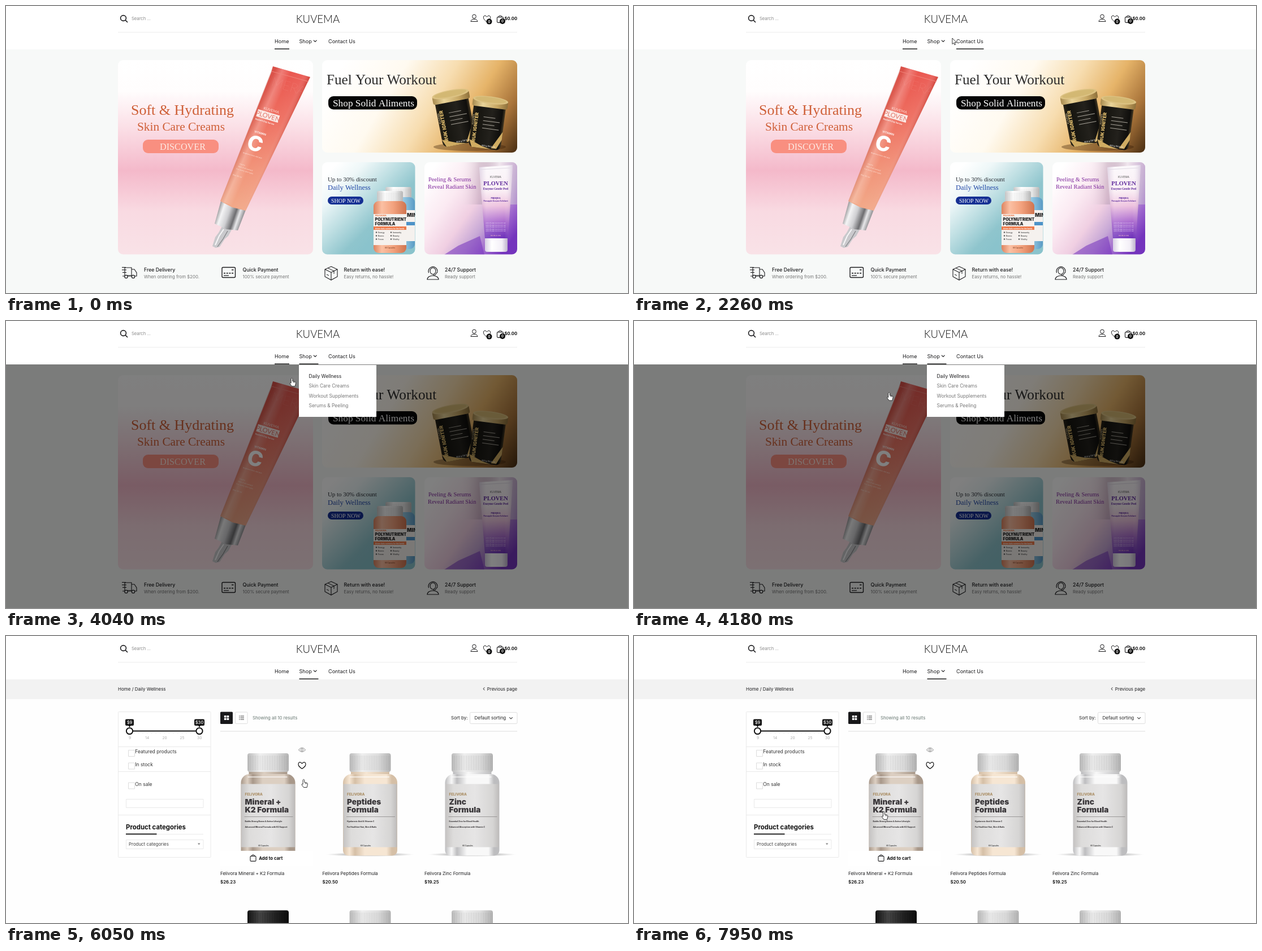
Animation, 1100 px wide and 509 px high, one loop 8 s. Source, as an HTML page with a canvas:

```html
<!DOCTYPE html>
<html lang="en">
<head>
<meta charset="utf-8">
<title>Shop walkthrough</title>
<style>
html, body { margin: 0; width: 100%; height: 100%; overflow: hidden; background: #fff; }
canvas { display: block; width: 1100px; height: 509px; }
</style>
</head>
<body>
<canvas id="stage" width="1100" height="509"></canvas>
<script>
const g = document.getElementById('stage').getContext('2d');
const LOOP = 8000, MENU_AT = 2330, SHOP_AT = 4250, IMAGES_AT = 4740, READY_AT = 4860;
const UI = 'Inter, sans-serif', PLAIN = '"Liberation Sans", Arial, sans-serif';
const SERIF = '"Liberation Serif", serif', LOGO = 'Lato, sans-serif';
const INK = '#1c1c1e', GREY = '#777', HAIR = '#e9e9e9';
const BRAND = 'KUVEMA', RANGE = 'PLOVEN', MAKER = 'Felivora';

// time, x, y of the pointer tip
const PATH = [
  [390, 1084, 489], [750, 1050, 350], [1150, 957, 154], [1220, 951, 150], [1600, 800, 104],
  [1970, 649, 61], [2260, 563, 57], [2330, 554, 58], [2680, 551, 61], [2880, 551, 63],
  [3120, 548, 96], [3300, 543, 89], [3555, 543, 89], [3560, 537, 88], [3695, 537, 88],
  [3770, 541, 96], [3965, 541, 96], [4040, 506, 101], [4300, 405, 148], [4670, 311, 194],
  [5200, 335, 240], [5560, 414, 300], [5800, 470, 288], [6050, 526, 254], [6400, 725, 262],
  [6700, 785, 280], [7000, 720, 286], [7270, 527, 288], [7500, 470, 300], [7950, 442, 311]
];
// product column, pointer enters, pointer leaves
const HOVERS = [[0, 5570, 6100], [1, 6130, 6430], [2, 6450, 6920], [1, 6960, 7220], [0, 7290, 9999]];

const clamp = v => Math.max(0, Math.min(1, v));

function text(str, x, y, size, color = INK, weight = 400, font = UI, align = 'left') {
  g.font = `${weight} ${size}px ${font}`;
  g.textAlign = align;
  g.fillStyle = color;
  g.fillText(str, x, y);
}
function paint(fill, stroke, width = 1) {
  if (fill) { g.fillStyle = fill; g.fill(); }
  if (stroke) { g.strokeStyle = stroke; g.lineWidth = width; g.stroke(); }
}
function box(x, y, w, h, r, fill, stroke, width) {
  g.beginPath(); g.roundRect(x, y, w, h, r); paint(fill, stroke, width);
}
function oval(x, y, rx, ry, fill, stroke, width) {
  g.beginPath(); g.ellipse(x, y, rx, ry, 0, 0, 7); paint(fill, stroke, width);
}
function trace(pts) {
  g.beginPath();
  for (let i = 0; i < pts.length; i += 2) g.lineTo(pts[i], pts[i + 1]);
}
function poly(fill, ...pts) { trace(pts); g.closePath(); paint(fill); }
function line(color, width, ...pts) { trace(pts); paint(null, color, width); }
function grad(x0, y0, x1, y1, ...stops) {
  const gr = g.createLinearGradient(x0, y0, x1, y1);
  for (let i = 0; i < stops.length; i += 2) gr.addColorStop(stops[i], stops[i + 1]);
  return gr;
}
function at(x, y, angle, draw) {
  g.save(); g.translate(x, y); g.rotate(angle); draw(); g.restore();
}
function card(x, y, w, h, fill, draw) {
  g.save();
  box(x, y, w, h, 9, fill);
  g.clip(); draw(); g.restore();
}

// ---- icons ----
function heart(x, y, s, color = INK, width = 1) {
  g.beginPath();
  g.moveTo(x, y + s);
  g.bezierCurveTo(x - s * 2, y - s * .2, x - s * .8, y - s * 1.7, x, y - s * .55);
  g.bezierCurveTo(x + s * .8, y - s * 1.7, x + s * 2, y - s * .2, x, y + s);
  paint(null, color, width);
}
function bag(x, y, w, h) {
  box(x - w / 2, y - h * .3, w, h * .75, 1.5, null, INK, 1.1);
  g.beginPath(); g.arc(x, y - h * .28, w * .27, Math.PI, 0); paint(null, INK, 1);
}
function badge(x, y) {
  oval(x, y, 5, 5, '#111');
  text('0', x, y + 2.2, 6, '#fff', 600, UI, 'center');
}
function chevron(x, y, s, color = INK) { line(color, 1.1, x - s, y - s / 2, x, y + s / 2, x + s, y - s / 2); }
function glyph(x, y, w, h, color = '#8d8577') { box(x + .5, y + .5, w - 1, h - 1, 0, null, color, .8); }

// ---- header ----
function header(ready, underlines) {
  const font = ready ? UI : PLAIN;
  g.fillStyle = '#fff'; g.fillRect(0, 0, 1100, 77);
  g.fillStyle = '#ececec'; g.fillRect(198, 46, 706, 1);
  if (ready) {
    oval(207.5, 21.5, 4.9, 4.9, null, INK, 1.6);
    line(INK, 1.7, 211, 25, 215, 29);
    text('Search ...', 222, 25, 7.6, '#8a8a8a');
    text(BRAND, 551.5, 29.5, 18.6, '#111', 300, LOGO, 'center');
    oval(828, 18.6, 3.3, 3.5, null, INK, 1);
    g.beginPath(); g.moveTo(822, 27.5); g.bezierCurveTo(822, 22, 834, 22, 834, 27.5); g.closePath(); paint(null, INK);
    heart(850.5, 22.5, 5.6); badge(854.5, 27.6);
    bag(874, 23.5, 11, 13); badge(878, 27);
    text('$0.00', 904, 25, 7.6, '#111', 700, UI, 'right');
    text('Home', 475, 65.5, 9.15, INK);
    text('Shop', 518.5, 65.5, 9.15, INK);
    chevron(546.7, 62, 2.8);
    text('Contact Us', 570, 65.5, 9.1, INK);
  } else {
    glyph(202, 17, 10, 12); glyph(834, 18, 10, 12, '#777');
    text('Search ...', 218, 26, 8, '#8b8f8f', 400, font);
    glyph(854, 20, 8, 9, '#777'); badge(862.5, 27.6);
    glyph(875, 19, 7, 7, '#777'); badge(880, 27);
    text('$0.00', 904, 25, 7.9, '#111', 700, font, 'right');
    text('Home', 481, 65.5, 8.75, INK, 400, font);
    text('Shop', 522, 65.5, 8.75, INK, 400, font);
    glyph(544, 59, 6.5, 8, '#444');
    text('Contact Us', 569, 65.5, 8.75, INK, 400, font);
  }
  g.fillStyle = '#111';
  for (const [x0, x1] of underlines) g.fillRect(x0, 75.4, x1 - x0, 1.4);
}

// ---- home page ----
function skinCard() {
  const pink = grad(0, 96, 0, 440, 0, '#fff', .16, '#fffdfd', .34, '#fbe0e7', .57, '#f4b9ca', .78, '#f9dae2', 1, '#f9e2e7');
  card(198, 96, 345, 344.5, pink, () => {
    text('Soft & Hydrating', 221, 193, 26, '#cf6038', 400, SERIF);
    text('Skin Care Creams', 232, 221, 21.3, '#cf6038', 400, SERIF);
    box(242, 237, 134, 24, 9, '#f98f80');
    text('DISCOVER', 272, 255, 16.2, '#fdeae4', 400, SERIF);
    dropperTube();
  });
}
function dropperTube() {
  const metal = grad(372, 366, 416, 381, 0, '#8c8c8e', .2, '#f4f4f5', .45, '#cfcfd2', .7, '#6d6d70', .85, '#e8e8ea', 1, '#9b9b9e');
  poly('#c9c9cc', 382, 391, 399, 397, 393, 408, 387, 413, 378, 427, 371, 429, 365, 426, 370, 410, 376, 402);
  line('#7e7e82', 1.2, 392, 399, 384, 413, 374, 427);
  line('#f6f6f7', 2, 385, 396, 377, 408, 370, 424);
  poly(metal, 380, 346, 424, 362, 410, 398, 390, 396, 369, 386);
  poly(grad(505, 115, 400, 355, 0, '#ea5750', .35, '#ee6f60', .7, '#f19278', 1, '#f2a888'),
    472, 107, 538, 126, 534, 134, 424, 363, 400, 357, 379, 346, 469, 118);
  poly(grad(425, 230, 480, 254, 0, 'rgba(160,50,40,.22)', .2, 'rgba(255,255,255,.22)', .45, 'rgba(255,255,255,0)', .8, 'rgba(255,255,255,.05)', 1, 'rgba(170,50,40,.3)'),
    472, 107, 538, 126, 424, 363, 379, 346);
  line('#f0857b', 1, 470, 116, 535, 134);
  at(468, 141, .3, () => text('MERA', 0, 0, 23, 'rgba(255,215,205,.38)', 100, LOGO));
  at(455, 183, .29, () => text(BRAND, 0, 0, 6.6, '#fde0d8', 400, LOGO));
  at(446, 183, .29, () => {
    box(0, 0, 40, 13, 0, '#fbeae6');
    text(RANGE, 20, 10.8, 11.4, '#e2766a', 400, LOGO, 'center');
    text('Radiant Day Serum', 0, 19, 3.8, '#fff', 600);
  });
  at(439, 224, .29, () => text('VITAMIN', 0, 0, 5, '#fff', 600));
  at(424, 253, .27, () => text('C', 0, 0, 37, '#fff', 800));
  at(419, 261, .29, () => text('Brightens tired, dull skin', 0, 0, 3, '#fde3da', 500));
  at(413, 281, .29, () => {
    ['Hydra', 'With fruit extract', 'For every skin type'].forEach((s, i) => text(s, -i * 1.6, i * 5, 3.4, '#fbd9cb', 500));
    text('Net 30 ml', -6, 22, 3.6, '#fbd9cb', 500);
  });
}
function jar(x, y, angle, s) {
  at(x, y, angle, () => {
    g.scale(s, s);
    const dark = grad(-31, 0, 31, 0, 0, '#2c2517', .15, '#15140f', .6, '#23211c', .9, '#0f0e0c', 1, '#54452a');
    const gold = grad(-33, 0, 33, 0, 0, '#a88a4e', .3, '#e9d49a', .7, '#c7a764', 1, '#8f713b');
    box(-30, 8, 60, 82, [2, 2, 9, 9], dark);
    poly('#d0ac62', 12, 88, 30, 55, 30, 70, 22, 88);
    poly('#d0ac62', -30, 76, -5, 86, 12, 90, -24, 90);
    box(-33, -2, 66, 15, 4, gold);
    oval(0, -1, 33, 7, '#dcc283'); oval(0, -1.5, 29, 5, '#d3b873');
    at(-19, 80, -Math.PI / 2, () => {
      text('RUK IGNITER', 0, 0, 8.6, '#d9b76b', 900);
      text(BRAND, 32, -7, 4.5, '#cbb98f', 500);
    });
    for (let i = 0; i < 4; i++) box(-9, 31 + i * 7, 22 + i % 2 * 9, 1, 0, '#a9a49a');
    text('300 g (10.5 oz)', -6, 86, 3.6, '#eee', 600);
  });
}
function workoutCard() {
  const amber = grad(590, 110, 890, 290, 0, '#fff', .28, '#fffaf0', .5, '#f7ddb0', .68, '#e6b469', .84, '#a9743a', 1, '#41280f');
  card(559, 96, 345, 164, amber, () => {
    text('Fuel Your Workout', 567, 138.5, 25.2, '#2c2c2c', 400, SERIF);
    box(570, 160, 157, 23.5, 9, '#050505');
    text('Shop Solid Aliments', 578, 178, 17.3, '#fff', 400, SERIF);
    oval(820, 250, 64, 7, 'rgba(50,25,5,.35)');
    jar(786, 157, -.19, 1);
    jar(857, 168, .13, .95);
  });
}
function pillBottle(x, y, body, cap) {
  const c = grad(x - 23, 0, x + 23, 0, 0, '#c9c9c9', .3, '#fff', .7, '#eee', 1, '#b9b9b9');
  box(x - 23, y, 46, 21, 3, c);
  for (let i = -21; i < 22; i += 3) line('rgba(120,120,120,.22)', .7, x + i, y + 3, x + i, y + 19);
  box(x - 29, y + 18, 58, 92, 9, body);
  box(x - 29, y + 41, 58, 55, 0, '#f5f1ee');
}
function wellnessCard() {
  card(559, 277, 164.5, 163.5, grad(568, 296, 668, 396, 0, '#fff', .25, '#eef7f8', .55, '#bfdfe3', .85, '#8fc5cd', 1, '#8ac3cc'), () => {
    text('Up to 30% discount', 569, 310.5, 10.9, '#2b2f36', 400, SERIF);
    text('Daily Wellness', 569, 325.5, 12.5, '#2348a8', 400, SERIF);
    box(569, 338, 63, 14, 7, '#152f93');
    text('SHOP NOW', 601, 348.5, 10, '#fff', 400, SERIF, 'center');
    pillBottle(694, 321, grad(665, 0, 723, 0, 0, '#5d9fc6', .6, '#9fd0e8', 1, '#5a9bc4'));
    text('MIN', 709, 374, 9, '#2a2a2a', 900);
    box(665, 383, 58, 6, 0, '#4d93c8');
    pillBottle(679, 328, grad(650, 0, 708, 0, 0, '#dd8460', .25, '#fbc0a3', .6, '#f3a27e', 1, '#d0744f'));
    text(MAKER.toUpperCase(), 653, 373, 4, '#ef7d4c', 800);
    text('POLYNUTRIENT', 652.5, 381, 7.1, '#272727', 900);
    text('FORMULA', 652.5, 388.5, 7.1, '#272727', 900);
    box(650, 391, 58, 6, 0, '#ee7a4a');
    text('Active daily nutrients for the family', 653, 395.6, 3, '#fff', 700);
    ['Energy', 'Immunity', 'Bones', 'Beauty', 'Focus', 'Vitality'].forEach((s, i) => {
      const px = 655 + i % 2 * 26, py = 402.5 + (i >> 1) * 6;
      oval(px, py - 1, 1.2, 1.2, '#555');
      text(s, px + 3, py, 3.4, '#555', 600);
    });
    text('60 Capsules', 679, 430, 3, '#8b4a2e', 600, UI, 'center');
  });
}
function serumCard() {
  card(740, 277, 164, 163.5, grad(752, 292, 905, 400, 0, '#fff', .3, '#fbeaf2', .52, '#f0cfe2', .7, '#c7a8d6', .86, '#9a62cc', 1, '#7434bd'), () => {
    g.fillStyle = grad(800, 290, 904, 290, 0, 'rgba(255,255,255,0)', .35, 'rgba(150,130,150,.3)', .7, 'rgba(240,235,240,.8)', 1, 'rgba(190,170,205,.6)');
    g.fillRect(800, 277, 104, 75);
    poly('rgba(117,50,190,.55)', 775, 441, 800, 425, 838, 408, 846, 441);
    text('Peeling & Serums', 747, 311, 10.4, '#7f2a9d', 400, SERIF);
    text('Reveal Radiant Skin', 746, 323.5, 10.4, '#7f2a9d', 400, SERIF);
    box(847, 409, 40, 27, 4, grad(847, 0, 887, 0, 0, '#d8d0e4', .3, '#fff', .75, '#f3eff7', 1, '#bdb1cc'));
    poly(grad(0, 283, 0, 412, 0, '#fbf8fb', .35, '#faeef4', .55, '#eec3df', .78, '#a968cf', 1, '#6c2fb9'),
      837, 286, 896, 282, 895, 300, 888, 412, 847, 412, 838, 300);
    poly(grad(838, 0, 896, 0, 0, 'rgba(140,100,160,.2)', .2, 'rgba(255,255,255,.15)', .75, 'rgba(255,255,255,0)', 1, 'rgba(120,80,150,.25)'),
      837, 286, 896, 282, 888, 412, 847, 412);
    line('#e2dce6', 1, 838, 290, 895, 287);
    const mid = (s, y, size, color, weight, font = UI) => text(s, 866, y, size, color, weight, font, 'center');
    mid(BRAND, 304.5, 4.6, '#555', 400);
    mid(RANGE, 318, 10.4, '#5e2a9c', 700, SERIF);
    mid('Enzyme Gentle Peel', 326, 5.2, '#5e2a9c', 700, SERIF);
    mid('Papaya &', 342, 3.8, '#5e2a9c', 700);
    mid('Pineapple Enzyme Exfoliant', 346.5, 3.2, '#5e2a9c', 700);
    for (let i = 0; i < 5; i++) mid('Gently lifts away dull cells every day', 386 + i * 3.6, 2.1, '#e8d5f5', 400);
    mid('100 ml (3.4 oz)', 408, 2.6, '#f3b6c8', 600);
  });
}
function features() {
  box(210, 464, 12, 14, 0, null, INK, 1.1);
  line(INK, 1.1, 222, 467, 227, 467, 231, 473, 231, 479, 206, 479);
  line(INK, 1.1, 205, 463.5, 212, 463.5); line(INK, 1.1, 205, 468, 213, 468); line(INK, 1.1, 206, 472.5, 213, 472.5);
  for (const x of [212.5, 225]) oval(x, 480, 2.7, 2.7, '#f8faf9', INK, 1.2);
  box(382, 463.5, 23.5, 18, 2, null, INK, 1.4);
  for (let i = 0; i < 4; i++) box(385 + i * 4.7, 473, 3, 1.6, 0, INK);
  line(INK, 1.2, 385, 478, 394, 478); line(INK, 1.5, 399, 468, 402.5, 468);
  trace([575, 462, 586, 467, 586, 480, 575, 486, 564, 480, 564, 467]); g.closePath(); paint(null, INK, 1.1);
  line(INK, 1.1, 564, 467, 575, 472.5, 586, 467); line(INK, 1.1, 575, 472.5, 575, 486);
  line(INK, 1, 569, 464.6, 580, 470, 580, 475); line(INK, 1, 567, 476, 571, 478);
  g.beginPath(); g.arc(755, 470.5, 8, 2.8, .35); paint(null, INK, 1.2);
  oval(755, 470, 5, 5.8, null, INK, 1.1);
  line(INK, 1.1, 762.5, 472, 759, 477, 755, 477);
  g.beginPath(); g.moveTo(745, 485); g.bezierCurveTo(745, 476, 765, 476, 765, 485); g.closePath(); paint(null, INK, 1.2);
  [[244, 'Free Delivery', 'When ordering from $200.'], [418.5, 'Quick Payment', '100% secure payment'],
   [597.5, 'Return with ease!', 'Easy returns, no hassle!'], [776, '24/7 Support', 'Ready support']].forEach(([x, title, note]) => {
    text(title, x, 470.5, 8.75, INK, 500);
    text(note, x, 482.5, 7.8, GREY);
  });
}
function home(t) {
  g.fillStyle = '#f7f9f8'; g.fillRect(0, 77, 1100, 432);
  skinCard(); workoutCard(); wellnessCard(); serumCard(); features();
  const open = t >= MENU_AT, underlines = [[475, 501]];
  if (open) underlines.push([518.5, 552.5]);
  else if (t > 2110) underlines.push([570, 618.5]);
  if (open) { g.fillStyle = 'rgba(0,0,0,.5)'; g.fillRect(0, 77, 1100, 432); }
  header(true, underlines);
  if (!open) return;
  g.fillStyle = '#fff'; g.fillRect(518, 78, 137, 92);
  ['Daily Wellness', 'Skin Care Creams', 'Workout Supplements', 'Serums & Peeling'].forEach((s, i) =>
    text(s, 535.5, 100.5 + i * 17.5, 8.45, i === 0 && t > 3050 ? INK : GREY));
}

// ---- shop page ----
const PRODUCTS = [
  { name: 'Mineral + K2 Formula', price: '$26.23', label: ['Mineral +', 'K2 Formula'], edge: '#a8988a', mid: '#dccfc2',
    notes: ['Builds Strong Bones & Active Lifestyle', 'Advanced Mineral Formula with K2 Support'] },
  { name: 'Peptides Formula', price: '$20.50', label: ['Peptides', 'Formula'], edge: '#d5bfa6', mid: '#f6e6d3',
    notes: ['Hyaluronic Acid & Vitamin C', 'For Healthier Hair, Skin & Nails'] },
  { name: 'Zinc Formula', price: '$19.25', label: ['Zinc', 'Formula'], edge: '#bdbdbf', mid: '#f8f8f8',
    notes: ['Essential Zinc for Blood Health', 'Enhanced Absorption with Vitamin C'] }
];
function bottleCap(x, y, dark) {
  const tone = dark ? ['#161616', '#4a4a4a', '#222', '#0e0e0e'] : ['#bdbdbd', '#efefef', '#dedede', '#b5b5b5'];
  box(x - 36.5, y, 73, 33, 4, grad(x - 36, 0, x + 36, 0, 0, tone[0], .3, tone[1], .7, tone[2], 1, tone[3]));
  for (let i = -34; i < 36; i += 3) line(dark ? 'rgba(0,0,0,.3)' : 'rgba(110,110,110,.2)', 1, x + i, y + 4, x + i, y + 30);
}
function bottle(x, p) {
  const shadow = g.createRadialGradient(0, 0, 0, 0, 0, 78);
  shadow.addColorStop(0, 'rgba(70,70,70,.75)'); shadow.addColorStop(.55, 'rgba(90,90,90,.35)'); shadow.addColorStop(1, 'rgba(120,120,120,0)');
  g.save(); g.translate(x, 387.5); g.scale(1, .045); oval(0, 0, 78, 78, shadow); g.restore();
  box(x - 34, 239, 68, 9, 0, grad(x - 34, 0, x + 34, 0, 0, p.edge, .4, p.mid, 1, p.edge));
  box(x - 48, 245, 96, 144.5, [15, 15, 9, 9], grad(x - 48, 0, x + 48, 0, 0, p.edge, .12, p.mid, .22, p.edge, .4, p.mid, .8, p.mid, .9, p.edge, 1, p.edge));
  line('rgba(255,255,255,.6)', 2, x - 36, 250, x + 34, 250);
  box(x - 47.5, 262.5, 95, 112, 0, grad(x - 48, 0, x + 48, 0, 0, '#c4c2c1', .15, '#dddcdb', .55, '#e6e5e5', .88, '#d6d5d4', 1, '#bcbab9'));
  bottleCap(x, 208);
  const lx = x - 41;
  text(MAKER.toUpperCase(), lx, 283, 6.3, '#ab8f66', 800);
  p.label.forEach((s, i) => text(s, lx, 298.5 + i * 14.5, 13.6, '#3b383b', 900));
  line('#8c8a8a', .8, x - 42, 320.5, x + 44, 320.5);
  p.notes.forEach((s, i) => text(s, lx, 330 + i * 10.3, 3.5, '#3d3a3c', 800));
  text('60 Capsules', x - 8, 372.5, 3, '#444', 700, UI, 'center');
}
function hoverPanel(left, alpha) {
  if (alpha <= 0) return;
  g.globalAlpha = alpha;
  g.fillStyle = '#fff'; g.fillRect(left, 381, 164, 27);
  bag(left + 58, 394, 10, 12);
  text('Add to cart', left + 68.2, 396.5, 7.8, '#111', 700);
  const ex = left + 144.5;
  g.beginPath(); g.moveTo(ex - 6, 202); g.quadraticCurveTo(ex, 194.5, ex + 6, 202); g.quadraticCurveTo(ex, 209, ex - 6, 202); paint(null, '#777', .9);
  oval(ex, 202, 2, 2, null, '#777', .9);
  heart(ex, 229.5, 5.9, '#111', 1.2);
  g.globalAlpha = 1;
}
function heading(str, y, ready, size) {
  text(str, 212, y, size, '#111', 700, ready ? UI : PLAIN);
  g.fillStyle = HAIR; g.fillRect(212, y + 8, 137, 1);
  g.fillStyle = '#111'; g.fillRect(212, y + 7.4, 54.5, 1.8);
}
function sidebar(ready) {
  const font = ready ? UI : PLAIN;
  const rules = ready ? [196, 240, 317] : [176, 215, 290, 365];
  box(198.5, 134.5, 163.5, ready ? 258 : 310, 1, '#fff', HAIR);
  g.fillStyle = HAIR;
  for (const y of rules) g.fillRect(199, y, 163, 1);
  const checks = ready ? [[208, 202], [231, 224.5], [266, 259.5]] : [[188, 180], [208.5, 200.5], [241.5, 233.5]];
  ['Featured products', 'In stock', 'On sale'].forEach((s, i) => {
    const [ty, cy] = checks[i];
    box(216.5, cy + .5, 11, 11, 0, null, '#dcdcdc');
    text(s, ready ? 228.3 : 231.7, ty - .5, ready ? 8.5 : 8.4, '#333', 400, font);
  });
  if (ready) {
    box(218, 167.5, 124, 2, 0, '#111');
    [['$9', 218.5, 15], ['$30', 342, 18]].forEach(([s, x, w]) => {
      box(x - w / 2, 147.5, w, 11.5, 2, '#111');
      poly('#111', x - 2, 159, x + 2, 159, x, 162);
      text(s, x, 156.2, 7.6, '#fff', 500, UI, 'center');
      oval(x, 168.5, 5.6, 5.6, '#fff', '#111', 2);
    });
    [9, 14, 20, 25, 30].forEach((n, i) => text(n, 219 + i * 30.8, 183, 6.6, '#aaa', 400, UI, 'center'));
    for (let i = 0; i < 17; i++) line('#ddd', .6, 219 + i * 7.7, 171, 219 + i * 7.7, 173);
    box(212.5, 289.5, 136.5, 15, 0, null, HAIR);
    heading('Product categories', 343, true, 11.4);
    box(212.5, 361.5, 136.5, 16, 0, null, HAIR);
    text('Product categories', 217, 371.5, 7.9, '#444');
    poly('#888', 339, 367.5, 343.5, 367.5, 341.2, 370.5);
  } else {
    box(212, 148, 101, 15, 2, '#fff', '#666');
    box(212.5, 262.5, 136.5, 15, 0, null, HAIR);
    heading('Product categories', 316.5, false, 10.9);
    box(212, 334.5, 137, 18, 0, '#fff', '#666');
    text('Product categories', 218, 346.3, 7.7, '#111', 400, PLAIN);
    chevron(341.5, 343.5, 2.8, '#111');
    heading('Product tags', 391, false, 10.9);
    box(212, 409.5, 137, 19, 0, '#fff', '#666');
    box(336, 410.5, 12, 8, 0, '#eee'); box(336, 419.5, 12, 8, 0, '#eee');
    poly('#888', 339.5, 416, 344.5, 416, 342, 413); poly('#888', 339.5, 421.5, 344.5, 421.5, 342, 424.5);
  }
}
function toolbar(ready) {
  const font = ready ? UI : PLAIN;
  box(379, 134.5, 22, 21.5, 1.5, '#18181a');
  box(405.5, 135, 21.5, 20.5, 1.5, '#fff', '#dedede');
  if (ready) {
    for (let i = 0; i < 4; i++) box(385.8 + i % 2 * 4.7, 141 + (i >> 1) * 4.4, 3.8, 3.5, .6, '#fff');
    for (let i = 0; i < 3; i++) {
      box(412, 141.3 + i * 3, 1.5, 1.5, 0, '#777'); box(414.5, 141.3 + i * 3, 6.5, 1.4, 0, '#777');
    }
  } else { glyph(386, 141, 7, 9, '#bbb'); glyph(413, 141, 7, 9, '#bbb'); }
  text('Showing all 10 results', 436, 147.5, ready ? 7.8 : 8, '#667670', 400, font);
  g.fillStyle = '#dedede'; g.fillRect(379, 168.5, 525, 1);
  const sx = ready ? 820 : 810.5;
  text('Sort by:', ready ? 787 : 779, 148, ready ? 8 : 8, '#222', 400, font);
  box(sx + .5, 135.5, 903.5 - sx, ready ? 20 : 21, 2, '#fff', '#dedede');
  text('Default sorting', sx + 8.5, 148.3, ready ? 8 : 7.8, '#222', 400, font);
  if (ready) chevron(893, 145.5, 2.8, '#444');
}
function shop(t) {
  const ready = t >= READY_AT, loaded = t >= IMAGES_AT, font = ready ? UI : PLAIN;
  g.fillStyle = '#fefefe'; g.fillRect(0, 0, 1100, 509);
  header(ready, [ready ? [518.5, 552.5] : [522, 551.5]]);
  g.fillStyle = '#f2f2f2'; g.fillRect(0, 77, 1100, 35);
  text('Home / Daily Wellness', 198, 97, ready ? 8 : 7.8, INK, 400, font);
  text('Previous page', 904, 96.5, ready ? 7.9 : 7.7, INK, 400, font, 'right');
  if (ready) line(INK, 1, 846.3, 91.2, 844.2, 93.7, 846.3, 96.2);
  else glyph(850, 91, 4.5, 6.5, '#666');
  sidebar(ready);
  toolbar(ready);
  PRODUCTS.forEach((p, i) => {
    const left = 379 + i * 180.5, mid = left + 84.5;
    if (loaded || i !== 1) bottle(mid, p);
    if (loaded) bottleCap(mid, 486.5, i === 0);
    text(`${MAKER} ${p.name}`, left, 423.5, ready ? 8.05 : 7.8, INK, 400, font);
    text(p.price, left, 439, ready ? 7.9 : 8, '#111', ready ? 600 : 400, font);
  });
  for (const [col, enter, leave] of HOVERS)
    hoverPanel(379 + col * 180.5, clamp((t - enter) / 200) * (1 - clamp((t - leave) / 200)));
}

// ---- pointer ----
function tipAt(t) {
  const i = PATH.findIndex(k => k[0] > t);
  if (i < 0) return PATH[PATH.length - 1].slice(1);
  const [t0, x0, y0] = PATH[i - 1], [t1, x1, y1] = PATH[i], u = (t - t0) / (t1 - t0);
  return [x0 + (x1 - x0) * u, y0 + (y1 - y0) * u];
}
function overLink(t, x, y) {
  if (t < MENU_AT) return (x > 570 && x < 618 && y < 77) || (x > 559 && x < 904 && y > 96);
  if (t < SHOP_AT) return t > 3050;
  return x > 379 && y > 180 && (x - 379) % 180.5 < 164;
}
function pointer(t) {
  if (t < PATH[0][0]) return;
  const [x, y] = tipAt(t);
  g.save(); g.translate(x, y); g.lineJoin = 'round';
  if (overLink(t, x, y)) {
    g.beginPath();
    g.moveTo(-1.5, 9);
    g.lineTo(-1.5, 1.3); g.quadraticCurveTo(0, -.8, 1.2, 1.3);
    g.lineTo(1.2, 5.5); g.lineTo(5.6, 6.4); g.quadraticCurveTo(7, 7, 6.8, 9);
    g.lineTo(5.6, 14.5); g.lineTo(-.2, 14.5); g.lineTo(-3.7, 9.6); g.quadraticCurveTo(-3.4, 7.4, -1.5, 9);
    g.closePath(); paint('#fff', '#222', .9);
    line('#222', .7, 2.9, 6.2, 2.9, 8.5); line('#222', .7, 4.7, 6.6, 4.7, 8.7);
  } else {
    trace([0, 0, 0, 10.6, 2.4, 8.4, 4.1, 12, 5.7, 11.2, 4.1, 7.7, 7.3, 7.5]);
    g.closePath(); paint('#fff', '#222', .9);
  }
  g.restore();
}

function frame() {
  const t = performance.now() % LOOP;
  (t < SHOP_AT ? home : shop)(t);
  pointer(t);
  requestAnimationFrame(frame);
}
frame();
</script>
</body>
</html>
```
